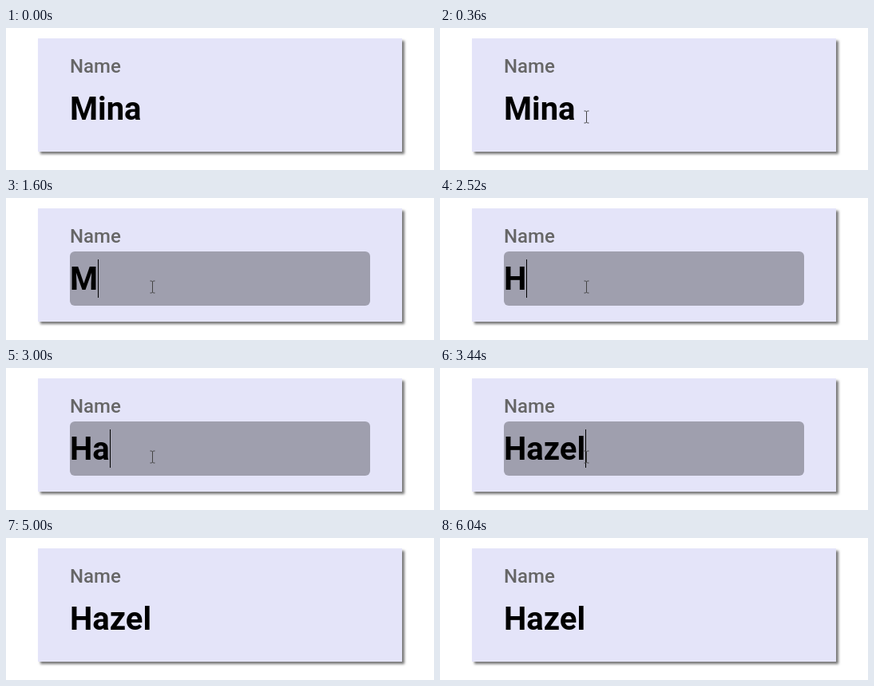
An HTML page that plays this animation: 536 px wide and 178 px high, repeating every 6640 ms.

```html
<!DOCTYPE html>
<html lang="en">
<head>
<meta charset="utf-8">
<title>Editable name field</title>
<style>
  html, body { margin: 0; width: 100%; height: 100%; overflow: hidden; background: #fff; }
  body { position: relative; font-family: Roboto, sans-serif; }
  body > * { position: absolute; }
  .card {
    left: 40px; top: 13px; width: 456px; height: 142px;
    background: #e4e4f9; box-shadow: 3px 3px 3px #777;
  }
  .label {
    left: 80px; top: 34px;
    font-size: 24px; font-weight: 500; line-height: 28px; color: #666;
  }
  .field {
    left: 80px; top: 67px; width: 376px; height: 68px;
    border-radius: 6px; background: rgba(0, 0, 0, .3);
  }
  .value {
    left: 80px; top: 78px; height: 47px;
    font-size: 40px; font-weight: 700; line-height: 47px; color: #000; white-space: pre;
  }
  .caret {
    position: absolute; left: 100%; top: -1px;
    width: 1px; height: 48px; background: #000;
  }
  .pointer { left: 0; top: 0; overflow: visible; }
  .hidden { visibility: hidden; }
</style>
</head>
<body>
  <div class="card"></div>
  <div class="label">Name</div>
  <div class="field hidden" id="field"></div>
  <div class="value"><span id="text">Mina</span><i class="caret hidden" id="caret"></i></div>
  <svg class="pointer" width="1" height="1">
    <path id="arrow" class="hidden" d="M0 0V16L4 12.5L6.5 18L9 17L6.500 11.500H11.500Z"
          fill="#fff" stroke="#000"/>
    <path id="beam" class="hidden" d="M-3 -7.500H-1L0 -6.500L1 -7.500H3M0 -6.500V6.500M-3 7.500H-1L0 6.500L1 7.500H3"
          fill="none" stroke="#444"/>
  </svg>
<script>
  const LOOP = 6640;
  const el = id => document.getElementById(id);
  const [field, text, caret, arrow, beam] = ['field', 'text', 'caret', 'arrow', 'beam'].map(el);

  // [time, value] pairs; each value holds until the next time
  const typing = [
    [0, 'Mina'], [1320, 'Min'], [1440, 'Mi'], [1560, 'M'], [1800, ''],
    [2520, 'H'], [2760, 'Ha'], [3080, 'Haz'], [3240, 'Haze'], [3400, 'Hazel']
  ];
  const caretOn = [[400, 920], [1320, 1960], [2520, 3920], [4440, 5000]];

  // [time, x, y] pointer path
  const path = [
    [40, 180, 135], [120, 181, 131], [320, 183.5, 111.5],
    [4480, 183.5, 111.5], [4640, 194.5, 122.5]
  ];

  const within = (t, a, b) => t >= a && t < b;
  const show = (node, on) => node.classList.toggle('hidden', !on);
  const ease = k => k * (2 - k);

  function pointerAt(t) {
    const i = path.findIndex(p => p[0] > t);
    const [t0, x0, y0] = path[i - 1], [t1, x1, y1] = path[i];
    const k = ease((t - t0) / (t1 - t0));
    return [x0 + (x1 - x0) * k, y0 + (y1 - y0) * k];
  }

  function draw(t) {
    text.textContent = typing.filter(s => s[0] <= t).pop()[1];
    show(field, within(t, 400, 5000));
    show(caret, caretOn.some(([a, b]) => within(t, a, b)));
    show(arrow, within(t, 40, 120));
    show(beam, within(t, 120, 4640));
    if (within(t, 40, 4640)) {
      const [x, y] = pointerAt(t).map(v => Math.floor(v) + .5);
      for (const p of [arrow, beam]) p.setAttribute('transform', `translate(${x} ${y})`);
    }
  }

  const start = performance.now();
  function tick() {
    draw((performance.now() - start) % LOOP);
    requestAnimationFrame(tick);
  }
  tick();
</script>
</body>
</html>
```
